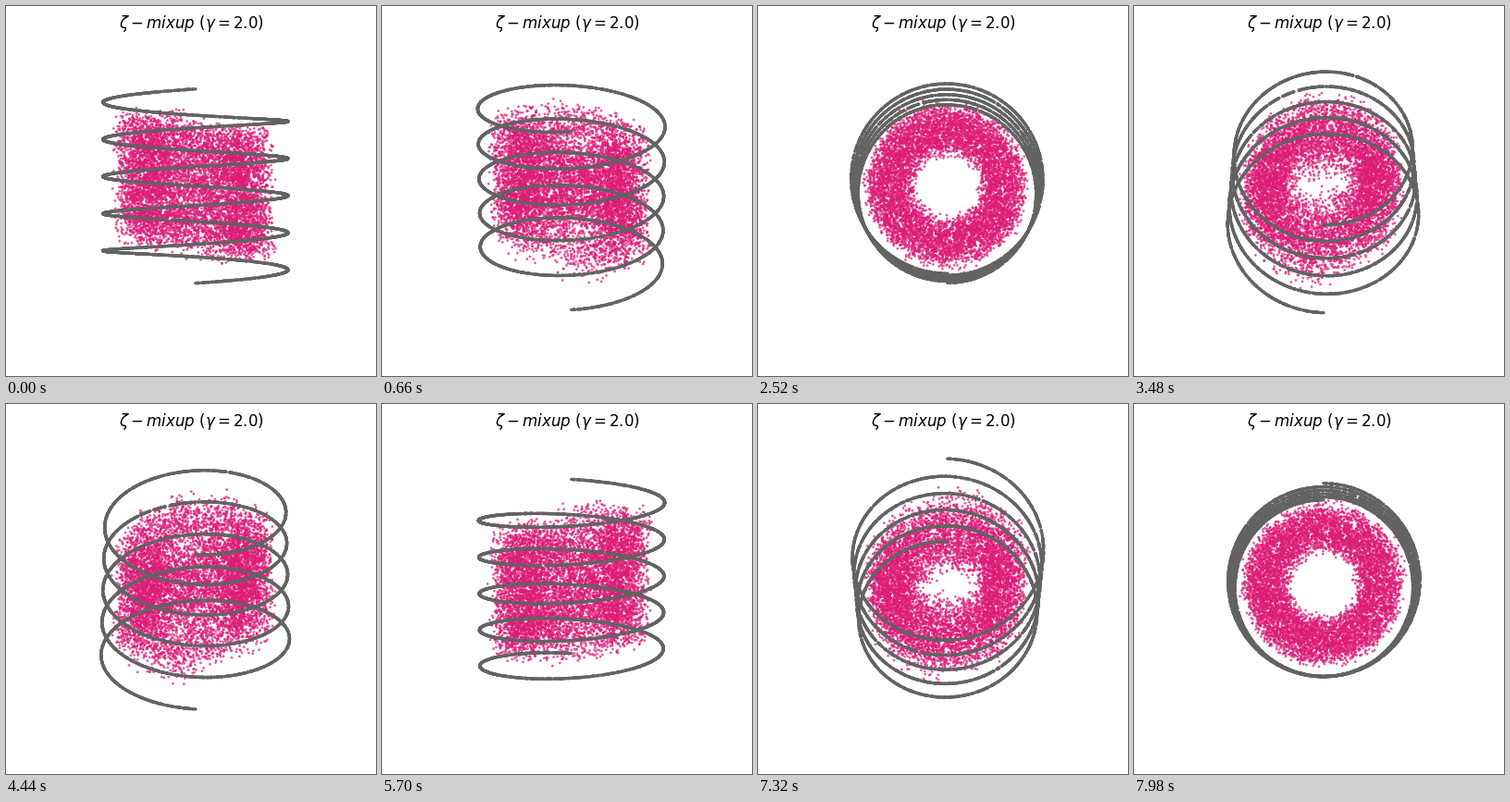
Recreate the animation shown at these times as a matplotlib script. Size 400 by 400 pixels, loop 8 s.

```python
import numpy as np
import matplotlib.pyplot as plt
from matplotlib.animation import FuncAnimation
from matplotlib.colors import to_rgba

SIZE, DPI = 400, 100
CENTER = (204.9, 194.7)
DIST = 2162            # camera distance in pixels
RADIUS, HALF_H, TURNS = 99.8, 100.1, 5
N_CURVE, N_CLOUD, N_MIX, GAMMA = 5000, 8000, 32, 2.0
GRAY, PINK = "#636363", "#dd1c77"
FULL_TURN_STEPS = 179  # picture changes per full tilt
FRAMES, INTERVAL = 160, 50

rng = np.random.default_rng(7)


def helix(u):
    """Points (right, front, up) along the helix for u in 0..1, top to bottom."""
    t = 2 * np.pi * TURNS * u
    return np.column_stack([-RADIUS * np.sin(t), RADIUS * np.cos(t),
                            HALF_H * (1 - 2 * u)])


def zeta_mixup(points, n):
    """Weighted means of random points with weights i ** -gamma."""
    w = np.arange(1, N_MIX + 1) ** -GAMMA
    picks = rng.integers(len(points), size=(n, N_MIX))
    return np.einsum("k,nkd->nd", w / w.sum(), points[picks])


def project(points, elev):
    """Screen positions seen by a camera tilted by elev."""
    c, s = np.cos(elev), np.sin(elev)
    x, front, z = points.T
    k = 1 / (1 - (front * c + z * s) / DIST)
    return np.column_stack([CENTER[0] + k * x,
                            CENTER[1] - k * (z * c - front * s)])


curve = helix(np.sort(np.r_[0, rng.random(N_CURVE - 2), 1]))
cloud = zeta_mixup(curve, N_CLOUD)

fig = plt.figure(figsize=(SIZE / DPI, SIZE / DPI), dpi=DPI, facecolor="white")
ax = fig.add_axes([0, 0, 1, 1])
ax.set(xlim=(0, SIZE), ylim=(SIZE, 0))
ax.axis("off")
fig.suptitle(r"$\zeta-mixup\ (\gamma=2.0)$", fontsize=12)


def dots(points, color, alpha, diameter, zorder):
    # one colour per dot keeps the dots off the pixel grid
    rgba = np.tile(to_rgba(color, alpha), (len(points), 1))
    return ax.scatter(points[:, 0], points[:, 1], s=(diameter * 72 / DPI) ** 2,
                      c=rgba, linewidths=0, zorder=zorder)


cloud_art = dots(cloud, PINK, 0.72, 2.75, 1)
curve_art = dots(curve, GRAY, 1, 3.4, 2)


def update(i):
    step = -(-5 * i // 6)      # the picture changes every 60 ms
    elev = 2 * np.pi * step / FULL_TURN_STEPS
    cloud_art.set_offsets(project(cloud, elev))
    curve_art.set_offsets(project(curve, elev))
    return cloud_art, curve_art


anim = FuncAnimation(fig, update, frames=FRAMES, interval=INTERVAL,
                     repeat=True, repeat_delay=0, blit=False)
plt.show()
```
